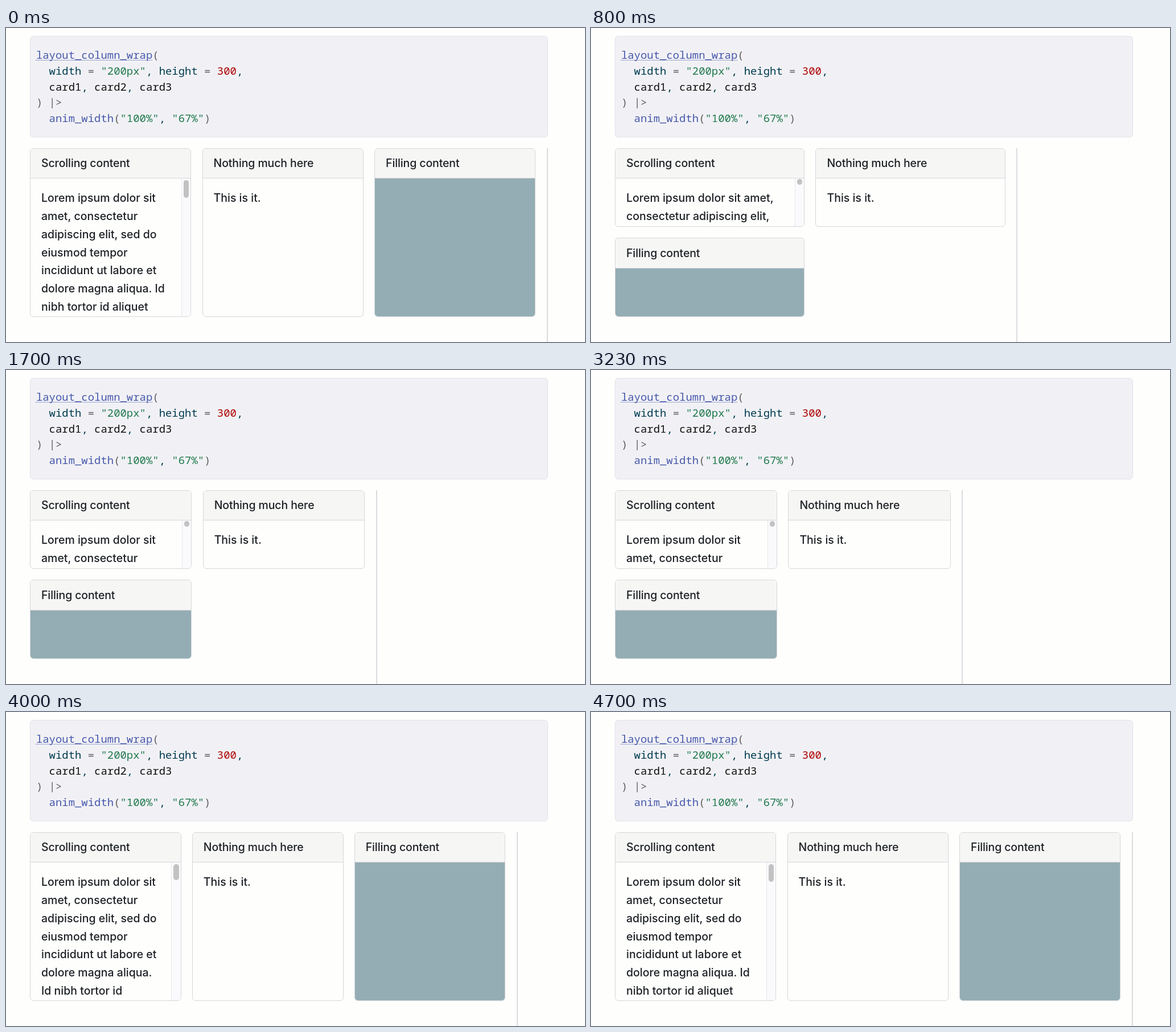
An HTML page for the animation above (5.4 s loop, 1017x551 px).

```html
<!DOCTYPE html>
<html lang="en">
<head>
<meta charset="utf-8">
<title>Column wrap</title>
<style>
  * { box-sizing: border-box; }
  html, body { margin: 0; width: 100%; height: 100%; overflow: hidden; background: #fefefd; }
  #stage {
    position: relative; width: 1017px; height: 551px; overflow: hidden;
    font: 500 19.5px/31.68px Inter, sans-serif; color: #1d2125;
  }
  pre {
    position: absolute; left: 42px; top: 14px; width: 910px; height: 178px; margin: 0;
    padding: 19.3px 0 0 9.9px; border: 1px solid #e1e1e9; border-radius: 6px;
    background: #f1f1f5; color: #003b4f;
    font: 500 18.93px/27.7px "Noto Sans Mono", monospace; font-variant-ligatures: none;
  }
  .fn { color: #4758ab; }
  .link { text-decoration: underline dotted 1px; text-underline-offset: 1.5px; text-decoration-skip-ink: none; }
  .op { color: #5e5e5e; }
  .str { color: #20794d; }
  .num { color: #ad0000; }
  .var { color: #101010; }

  #box {
    position: absolute; left: 42px; top: 211px; height: 360px;
    padding-right: 19.6px; border-right: 2px solid #dcdcdf;
  }
  #grid {
    display: grid; height: 295.6px; gap: 19.2px;
    grid-template-columns: repeat(auto-fit, minmax(240px, 1fr)); grid-auto-rows: minmax(0, 1fr);
  }
  .card {
    display: flex; flex-direction: column; min-width: 0; min-height: 0; overflow: hidden;
    border: 1px solid #d6d7d9; border-radius: 6px;
  }
  .head {
    flex: none; height: 52.2px; padding: 10.3px 19px 0; white-space: nowrap; letter-spacing: -0.12px;
    background: #f6f6f5; border-bottom: 1px solid #d6d7d9;
  }
  .body { position: relative; flex: 1; min-height: 0; padding: 19.3px 19px 0; overflow: hidden; }
  .scroll { padding-right: 35.5px; }
  .fill { background: #94adb4; }
  .track {
    position: absolute; top: 0; right: 0; bottom: 0; width: 16.5px;
    background: #fafafd; border-left: 1px solid #e8e8ec;
  }
  #thumb { position: absolute; right: 3px; width: 9.5px; border-radius: 5px; background: #c2c2c3; }
</style>
</head>
<body>
<div id="stage">
<pre><span class="fn link">layout_column_wrap</span><span class="op">(</span>
  width <span class="op">=</span> <span class="str">"200px"</span>, height <span class="op">=</span> <span class="num">300</span>,
  <span class="var">card1</span>, <span class="var">card2</span>, <span class="var">card3</span>
<span class="op">) |&gt;</span>
  <span class="fn">anim_width</span><span class="op">(</span><span class="str">"100%"</span>, <span class="str">"67%"</span><span class="op">)</span></pre>
  <div id="box">
    <div id="grid">
      <div class="card">
        <div class="head">Scrolling content</div>
        <div class="body scroll">Lorem ipsum dolor sit amet, consectetur adipiscing elit, sed do eiusmod tempor incididunt ut labore et dolore magna aliqua. Id nibh tortor id aliquet lectus proin nibh nisl.<div class="track"><div id="thumb"></div></div></div>
      </div>
      <div class="card">
        <div class="head">Nothing much here</div>
        <div class="body">This is it.</div>
      </div>
      <div class="card">
        <div class="head">Filling content</div>
        <div class="body fill"></div>
      </div>
    </div>
  </div>
</div>
<script>
const LOOP = 5400, RUN = 1500, SHRINK = 208, GROW = 3217, TICK = 100 / 3;
const FULL = 910, SMALL = 0.67 * FULL, THREE_COLS = 780;
const box = document.getElementById("box");
const thumb = document.getElementById("thumb");
const card = document.querySelector(".card");

const bezier = (s, a, b) => 3 * (1 - s) ** 2 * s * a + 3 * (1 - s) * s * s * b + s ** 3;

// CSS "ease": cubic-bezier(.25, .1, .25, 1)
function ease(x) {
  if (x <= 0) return 0;
  if (x >= 1) return 1;
  let lo = 0, hi = 1;
  for (let i = 0; i < 30; i++) {
    const mid = (lo + hi) / 2;
    if (bezier(mid, 0.25, 0.25) < x) lo = mid; else hi = mid;
  }
  return bezier(lo, 0.1, 1);
}

function render(time) {
  // The motion advances at 30 steps per second.
  const t = Math.floor((time % LOOP + 6.7) / TICK) * TICK;
  const shrunk = ease((t - SHRINK) / RUN) - ease((t - GROW) / RUN);
  const width = FULL + (SMALL - FULL) * shrunk;
  box.style.width = width + "px";

  const wide = width >= THREE_COLS;
  const cardWidth = card.getBoundingClientRect().width;
  thumb.style.top = (wide ? 3.3 : 0.8) + "px";
  thumb.style.height = (wide ? 30.7 + 0.18 * (cardWidth - 284) : 10.5) + "px";
}

const start = performance.now();
function loop() {
  render(performance.now() - start);
  requestAnimationFrame(loop);
}
loop();
</script>
</body>
</html>
```
